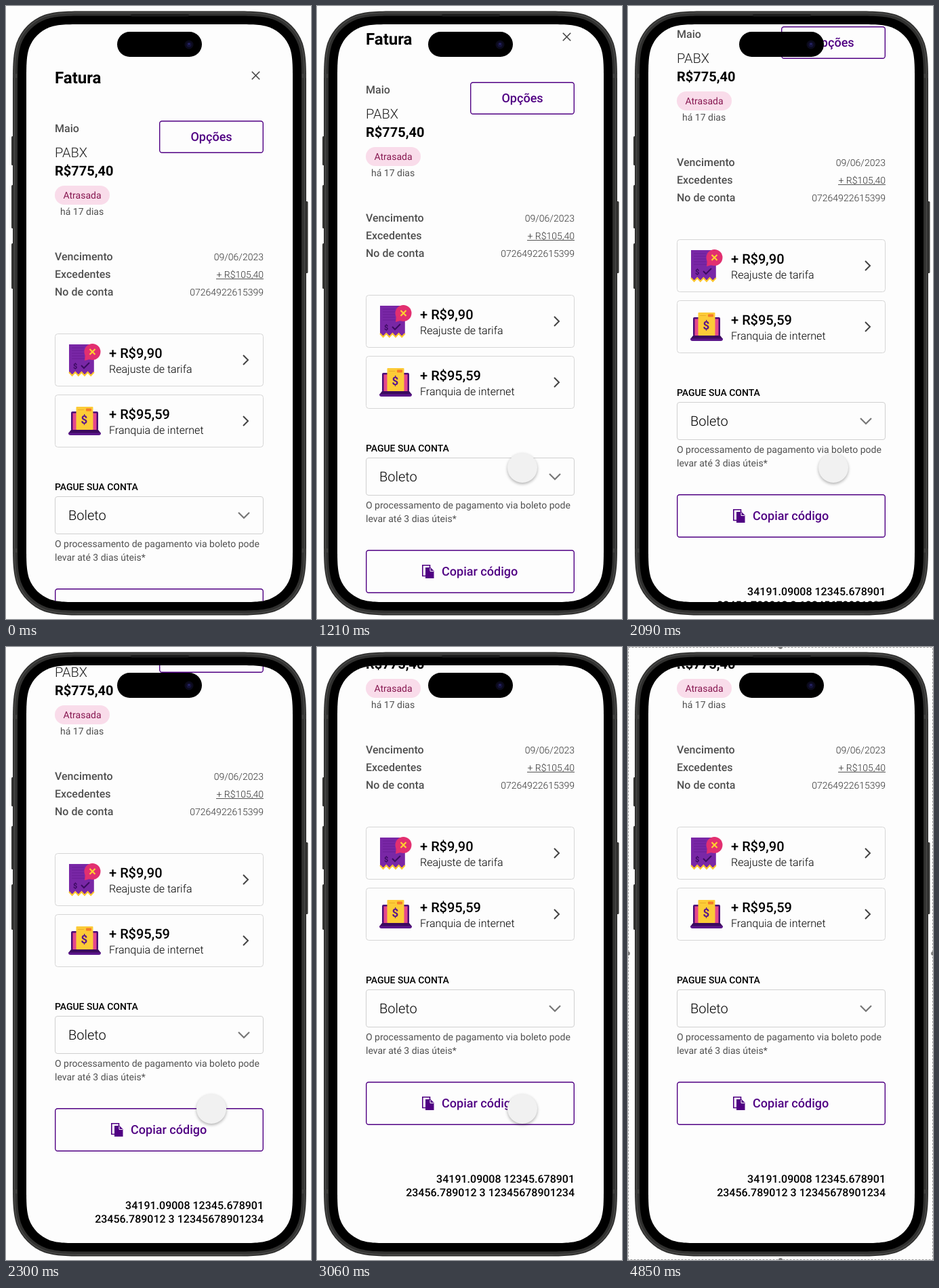
Write an HTML page with a canvas that moves like this. It is 450 px wide and 904 px high and loops after 4880 ms.

```html
<!DOCTYPE html>
<html lang="pt-BR">
<head>
<meta charset="utf-8">
<title>Fatura</title>
<style>
html, body { margin: 0; width: 100%; height: 100%; overflow: hidden; background: #fdfdfd; }
canvas { display: block; width: 450px; height: 904px; }
</style>
</head>
<body>
<canvas id="stage" width="450" height="904"></canvas>
<script>
const ctx = document.getElementById('stage').getContext('2d');
const LOOP = 4880;
const PURPLE = '#500083', GREY = '#505050', PAPER = '#fdfdfd';
// Each drag: start time, end time, scroll before, scroll after
const DRAGS = [[920, 1378, 0, 90], [1831, 2317, 90, 182], [2859, 3060, 182, 218]];

const ramp = (t, a, b) => Math.min(1, Math.max(0, (t - a) / (b - a)));
const scrollAt = t => DRAGS.reduce((s, [a, b, from, to]) => s + (to - from) * ramp(t, a, b), 0);

function roundRect(x, y, w, h, r, fill, stroke, lineWidth = 1) {
  ctx.beginPath();
  ctx.roundRect(x, y, w, h, r);
  if (fill) { ctx.fillStyle = fill; ctx.fill(); }
  if (stroke) { ctx.strokeStyle = stroke; ctx.lineWidth = lineWidth; ctx.stroke(); }
}

// Rectangle whose corners ease gradually into the straight sides
function smoothRect(x, y, w, h, r, fill) {
  const corner = (cx, cy, ux, uy, vx, vy) => {
    const p = (a, b) => [cx + r * (a * ux + b * vx), cy + r * (a * uy + b * vy)];
    ctx.lineTo(...p(0, 1.529));
    ctx.bezierCurveTo(...p(0, 1.088), ...p(0, .868), ...p(.075, .631));
    ctx.bezierCurveTo(...p(.169, .373), ...p(.373, .169), ...p(.631, .075));
    ctx.bezierCurveTo(...p(.868, 0), ...p(1.088, 0), ...p(1.529, 0));
  };
  ctx.beginPath();
  corner(x, y, 1, 0, 0, 1);
  corner(x + w, y, 0, 1, -1, 0);
  corner(x + w, y + h, -1, 0, 0, -1);
  corner(x, y + h, 0, -1, 1, 0);
  ctx.closePath();
  ctx.fillStyle = fill;
  ctx.fill();
}

function disc(x, y, r, fill) {
  ctx.beginPath();
  ctx.arc(x, y, r, 0, 7);
  ctx.fillStyle = fill;
  ctx.fill();
}

function trace(points) {
  ctx.beginPath();
  points.forEach(([x, y]) => ctx.lineTo(x, y));
}

function line(points, color, width) {
  trace(points);
  ctx.strokeStyle = color;
  ctx.lineWidth = width;
  ctx.stroke();
}

function poly(points, fill) {
  trace(points);
  ctx.fillStyle = fill;
  ctx.fill();
}

function text(str, x, y, size, weight, color, align = 'left') {
  ctx.font = `${weight} ${size}px Roboto, sans-serif`;
  ctx.textAlign = align;
  ctx.fillStyle = color;
  ctx.fillText(str, x, y);
}

function cross(x, y, r, color, width) {
  line([[x - r, y - r], [x + r, y + r]], color, width);
  line([[x + r, y - r], [x - r, y + r]], color, width);
}

function receiptIcon() {
  const hem = [];
  for (let i = 0; i <= 8; i++) hem.push([93 + i * 4.6, i % 2 ? 545 : 540]);
  poly([[129.8, 499], [93, 499], ...hem], '#7927a6');
  line(hem, '#fcc62e', 2);
  for (let y = 504; y < 522; y += 4) line([[97, y], [y < 520 ? 115 : 125, y]], '#6a1d96', 1);
  text('$', 99, 535, 11, 700, '#3c0b62');
  line([[111, 530], [115, 534], [123, 526]], '#3c0b62', 2);
  poly([[117, 513], [116, 523], [127, 520]], '#e22f70');
  disc(127.5, 510, 12, '#e22f70');
  cross(127.5, 510, 4, '#fdd22f', 2.2);
}

function laptopIcon() {
  roundRect(96, 598, 40, 28, 2, '#4b0c78');
  ctx.fillStyle = '#e5488c';
  ctx.fillRect(98.5, 600.5, 35, 24.5);
  roundRect(103.5, 591, 25, 34, 1, '#fccb37');
  roundRect(118, 593.5, 8, 4, 1, '#f47a28');
  line([[106, 595.5], [115, 595.5]], '#e8ae28', 1);
  text('$', 115.5, 616, 17, 700, '#5b168a', 'center');
  poly([[96, 625], [136, 625], [140, 630], [92, 630]], '#3b0a5e');
  roundRect(92, 629.5, 48, 3.5, [0, 0, 3, 3], '#5b168a');
}

function card(y, amount, label) {
  roundRect(72.5, y + .5, 307, 77, 4, PAPER, '#d6d6d6');
  text(amount, 152, y + 36, 20, 500, '#000');
  text(label, 152, y + 58, 16, 300, '#000');
  line([[350, y + 32], [357, y + 39], [350, y + 46]], '#444', 2);
}

function outlineButton(x, y, w, h) {
  roundRect(x + .7, y + .7, w - 1.4, h - 1.4, 3.5, null, PURPLE, 1.4);
}

function copyIcon() {
  line([[163, 881.8], [155.8, 881.8], [155.8, 897.5], [160, 897.5]], PURPLE, 1.6);
  line([[162.5, 881.8], [166.5, 881.8], [166.5, 885]], PURPLE, 1.6);
  poly([[160, 885], [167.5, 885], [172.5, 890], [172.5, 901], [160, 901]], PURPLE);
  line([[167, 886], [167, 890.5], [172, 890.5]], PAPER, 1);
}

function invoice() {
  text('Fatura', 72, 114, 24, 700, '#000');
  cross(368.5, 102.5, 5.7, '#444', 1.6);

  text('Maio', 72, 186, 16, 500, GREY);
  outlineButton(226, 169, 154, 48);
  text('Opções', 303, 199, 18, 500, PURPLE, 'center');
  text('PABX', 72, 223, 20, 300, '#222');
  text('R$775,40', 72, 250, 20, 700, '#000');
  roundRect(72, 265, 81, 28, 14, '#f9dcea');
  text('Atrasada', 112.5, 284, 14, 400, '#86164f', 'center');
  text('há 17 dias', 80, 308, 14, 400, GREY);

  [['Vencimento', '09/06/2023'], ['Excedentes', '+ R$105,40'], ['No de conta', '07264922615399']]
    .forEach(([label, value], i) => {
      text(label, 72, 375 + i * 26, 16, 500, GREY);
      text(value, 380, 375 + i * 26, 14, 300, '#333', 'right');
    });
  line([[310, 402.5], [380, 402.5]], '#555', 1);

  card(483, '+ R$9,90', 'Reajuste de tarifa');
  receiptIcon();
  card(573, '+ R$95,59', 'Franquia de internet');
  laptopIcon();

  text('PAGUE SUA CONTA', 72, 714, 14, 500, '#000');
  roundRect(72.5, 723.5, 307, 55, 3.5, null, '#d0d0d0');
  text('Boleto', 92, 758, 20, 300, '#000');
  line([[343, 747], [351, 755], [359, 747]], '#777', 2.2);
  text('O processamento de pagamento via boleto pode', 72, 798, 14, 400, GREY);
  text('levar até 3 dias úteis*', 72, 818, 14, 400, GREY);

  outlineButton(72, 859, 308, 64);
  copyIcon();
  text('Copiar código', 184, 897, 18, 500, PURPLE);
  text('34191.09008 12345.678901', 380, 1008, 16, 500, '#000', 'right');
  text('23456.789012 3 12345678901234', 380, 1028, 16, 500, '#000', 'right');
}

function phoneBody() {
  for (const [y, h] of [[192, 43], [264, 64], [350, 67]]) roundRect(8, y, 5, h, 1.5, '#353533');
  roundRect(440, 288, 5.5, 106, 1.5, '#353533');
  const shell = (inset, color) =>
    smoothRect(10 + inset, 7.5 + inset, 433 - 2 * inset, 891 - 2 * inset, 74 - inset, color);
  shell(0, '#2c2c2b');
  shell(1.5, '#454544');
  shell(3.5, '#30302f');
  for (const y of [100, 800]) {
    ctx.fillStyle = '#3e3e3d';
    ctx.fillRect(10.5, y, 6, 6);
    ctx.fillRect(436.5, y, 6, 6);
  }
  shell(7, '#000');
  roundRect(184, 12, 86, 3.5, 2, '#1c1c1c');
}

function island() {
  roundRect(164, 38, 125, 37, 18.5, '#000');
  disc(270, 57, 6.5, '#0b0a1c');
  disc(270, 57, 3.5, '#15133c');
  disc(270, 56, 1.3, '#2c2a70');
}

function pointer(t) {
  if (t < 330 || t > 3400) return;
  const enter = 1 - (1 - ramp(t, 300, 760)) ** 2;
  const x = 470 + (303 - 470) * enter, y = 926 + (681 - 926) * enter;
  const pressed = ramp(t, 1480, 1700) - ramp(t, 1830, 1950);
  ctx.save();
  ctx.globalAlpha = 1 - ramp(t, 3150, 3400);
  ctx.shadowColor = `rgba(0,0,0,${.3 - .17 * pressed})`;
  ctx.shadowBlur = 4;
  ctx.shadowOffsetY = 2 - 1.5 * pressed;
  disc(x, y, 22, '#f1f1f1');
  ctx.restore();
}

function selection() {
  ctx.setLineDash([3, 2]);
  ctx.strokeStyle = '#999';
  ctx.lineWidth = 1;
  ctx.strokeRect(.5, .5, 449, 903);
  ctx.setLineDash([]);
  for (const [x, y] of [[225, 0], [225, 904], [0, 452], [450, 452]]) disc(x, y, 3, '#808080');
}

function draw(now) {
  const t = now % LOOP;
  ctx.textRendering = 'geometricPrecision';
  ctx.fillStyle = PAPER;
  ctx.fillRect(0, 0, 450, 904);
  phoneBody();
  ctx.save();
  smoothRect(30, 27, 393, 852, 55, PAPER);
  ctx.clip();
  ctx.translate(0, -Math.round(scrollAt(t)));
  invoice();
  ctx.restore();
  island();
  pointer(t);
  if (t >= 4000) selection();
}

const start = performance.now();
function tick() {
  draw(performance.now() - start);
  requestAnimationFrame(tick);
}
tick();
</script>
</body>
</html>
```
